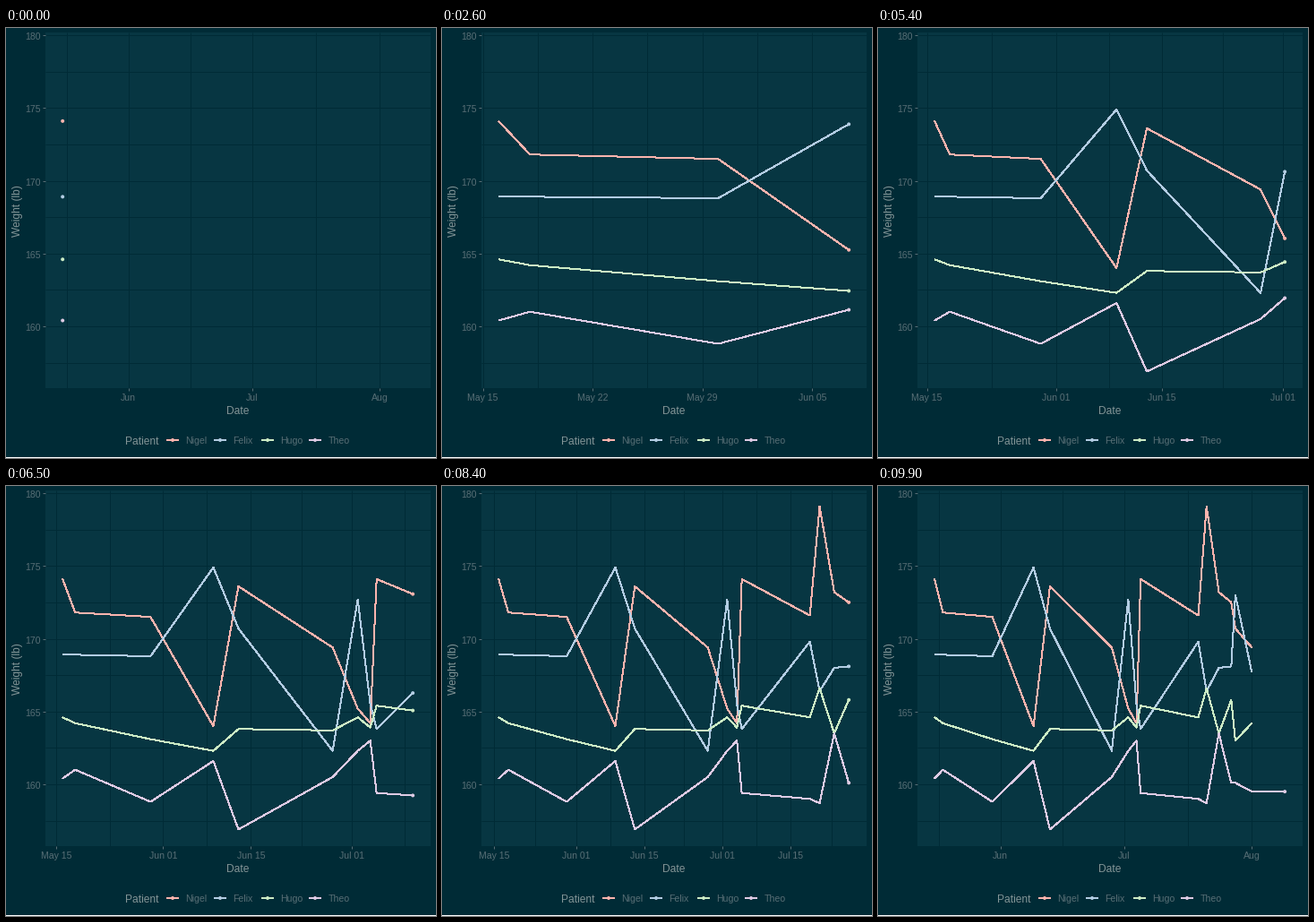
A matplotlib script for the animation above (10 s loop, 480 by 480 pixels).

```python
import numpy as np
import matplotlib.pyplot as plt
from matplotlib.animation import FuncAnimation
from matplotlib.patches import Circle, Rectangle

SIZE, DPI, FRAMES = 480, 100, 100
LEFT, RIGHT, TOP, BOTTOM = 44, 474, 5, 402
WIDTH = (RIGHT - LEFT) / 1.1       # 5 % expansion on each side
X0 = LEFT + WIDTH / 20 - 0.35
BG, PANEL, MUTED, TEXT = "#002B36", "#073642", "#586E75", "#839496"

START = np.datetime64("2017-05-16")
DAYS = np.array([0, 2, 14, 24, 28, 43, 47, 49, 50, 64, 66, 69, 72, 73, 77, 85])
KEYS = np.rint((FRAMES - 1) * DAYS / DAYS[-1])   # visits snap to whole frames

# weight at each visit
READINGS = {
    "Nigel": [174.1, 171.8, 171.5, 164, 173.6, 169.4, 165.2, 164.2,
              174.1, 171.6, 179.1, 173.2, 172.5, 170.7, 169.4, 163.3],
    "Felix": [168.9, 168.9, 168.8, 174.9, 170.7, 162.3, 172.7, 165.5,
              163.8, 169.8, 166.4, 168, 168.1, 173, 167.7, 173.8],
    "Hugo": [164.6, 164.2, 163.1, 162.3, 163.8, 163.7, 164.6, 163.9,
             165.4, 164.6, 166.6, 163.5, 165.8, 163, 164.2, 165.9],
    "Theo": [160.4, 161, 158.8, 161.6, 156.9, 160.5, 162.3, 163,
             159.4, 159, 158.7, 163.5, 160.1, 160.1, 159.5, 159.5],
}
COLORS = plt.get_cmap("Pastel1").colors

# candidate date ticks, as days from START: length of step and positions
MONTHS = np.arange("2017-04", "2017-10", dtype="datetime64[M]")
MONTHS = (MONTHS.astype("datetime64[D]") - START).astype(int)
HALVES = np.sort(np.r_[MONTHS, MONTHS + 14])
STEPS = [(n, np.arange(-15, 130, n)) for n in (1, 2, 7)]
STEPS += [(365.25 / 24, HALVES), (365.25 / 12, MONTHS)]

plt.rcParams["font.family"] = "Liberation Sans"
fig = plt.figure(figsize=(SIZE / DPI, SIZE / DPI), dpi=DPI, facecolor=BG)
ax = fig.add_axes([0, 0, 1, 1])
ax.set(xlim=(0, SIZE), ylim=(SIZE, 0))
ax.axis("off")


def px(n):
    return n * 72 / DPI


def y_pos(weight):
    return 333 - 16.25 * (np.asarray(weight) - 160)


def line(x, y, color, width=1, **kw):
    return ax.plot(x, y, color=color, lw=px(width), solid_capstyle="butt",
                   solid_joinstyle="round", **kw)[0]


def dot(x, y, color):
    return ax.add_patch(Circle((x, y), 2, fc=color, lw=0, zorder=5))


def label(x, y, s, size=10.5, color=MUTED, ha="center", **kw):
    return ax.text(x, y, s, fontsize=px(size), color=color, ha=ha,
                   va="baseline", **kw)


def cover(ticks, lo, hi):
    """Number of intervals needed to span lo..hi."""
    return np.searchsorted(ticks, hi) - np.searchsorted(ticks, lo, "right") + 1


def date_ticks(lo, hi, n=5):
    """Visible tick days and label format, aiming for n intervals."""
    span, best = hi - lo, 0
    if span > n:
        best = int(np.argmin([abs(span / step - n) for step, _ in STEPS]))
        count = cover(STEPS[best][1], lo, hi)
        if count != n:
            other = best + (1 if count > n else -1)
            other = min(max(other, 0), len(STEPS) - 1)
            if abs(cover(STEPS[other][1], lo, hi) - n) < abs(count - n):
                best = other
    ticks = STEPS[best][1]
    fmt = "%b" if ticks is MONTHS else "%b %d"
    return ticks[(ticks > lo) & (ticks < hi - 1e-6)], fmt


def minor_ticks(ticks, lo, hi):
    if len(ticks) < 2:
        return []
    gap = ticks[1] - ticks[0]
    ext = np.r_[ticks[0] - gap, ticks, ticks[-1] + gap]
    mid = (ext[1:] + ext[:-1]) / 2
    return mid[(mid > lo) & (mid < hi)]


def draw_static():
    ax.add_patch(Rectangle((LEFT, TOP), RIGHT - LEFT, BOTTOM - TOP,
                           fc=PANEL, lw=0, zorder=0))
    ax.add_patch(Rectangle((0, SIZE - 1), SIZE, 1, fc="white", lw=0))
    for w in np.arange(157.5, 181, 2.5):
        y = float(y_pos(w))
        line([LEFT, RIGHT], [y, y], BG, zorder=1)
        if w % 5 == 0:
            line([LEFT - 3, LEFT], [y, y], MUTED)
            label(38.5, y + 5, f"{w:.0f}", ha="right")
    label(259, 431, "Date", 12, TEXT)
    label(16, 204.5, "Weight (lb)", 12, TEXT, rotation=90,
          rotation_mode="anchor")
    label(132.5, 465, "Patient", 12, TEXT, ha="left")
    for k, name in enumerate(READINGS):
        x = 186 + 53 * k
        line([x - 7, x + 7], [460, 460], COLORS[k], 2)
        dot(x, 460, COLORS[k])
        label(x + 14.5, 464, name, ha="left")


draw_static()
live = []


def update(i):
    while live:
        live.pop().remove()

    now = np.interp(i, KEYS, DAYS)
    view = now if i else DAYS[-1]
    lo, hi = -0.05 * view, 1.05 * view

    def x_pos(day):
        return X0 + WIDTH * np.asarray(day) / view

    ticks, fmt = date_ticks(lo, hi)
    for t in np.r_[ticks, minor_ticks(ticks, lo, hi)]:
        x = float(x_pos(t))
        live.append(line([x, x], [TOP, BOTTOM], BG, zorder=1))
    for t in ticks:
        x = float(x_pos(t))
        date = (START + int(t)).astype(object)
        live.append(line([x, x], [BOTTOM, BOTTOM + 3], MUTED))
        live.append(label(x, 416, date.strftime(fmt)))

    past = KEYS < i
    for k, weights in enumerate(READINGS.values()):
        days, values = DAYS[past], np.array(weights)[past]
        # on the closing frame only the last patient has a reading
        if i < FRAMES - 1 or k == len(READINGS) - 1:
            weight = np.interp(i, KEYS, weights)
            days, values = np.r_[days, now], np.r_[values, weight]
            live.append(dot(float(x_pos(now)), float(y_pos(weight)), COLORS[k]))
        if len(days) > 1:
            # without antialiasing a 1 px stroke fills about 2 px
            live.append(line(x_pos(days), y_pos(values), COLORS[k],
                             antialiased=False, zorder=3))
    return live


anim = FuncAnimation(fig, update, frames=FRAMES, interval=100,
                     init_func=lambda: [], repeat=True, repeat_delay=0,
                     blit=False)
plt.show()
```
